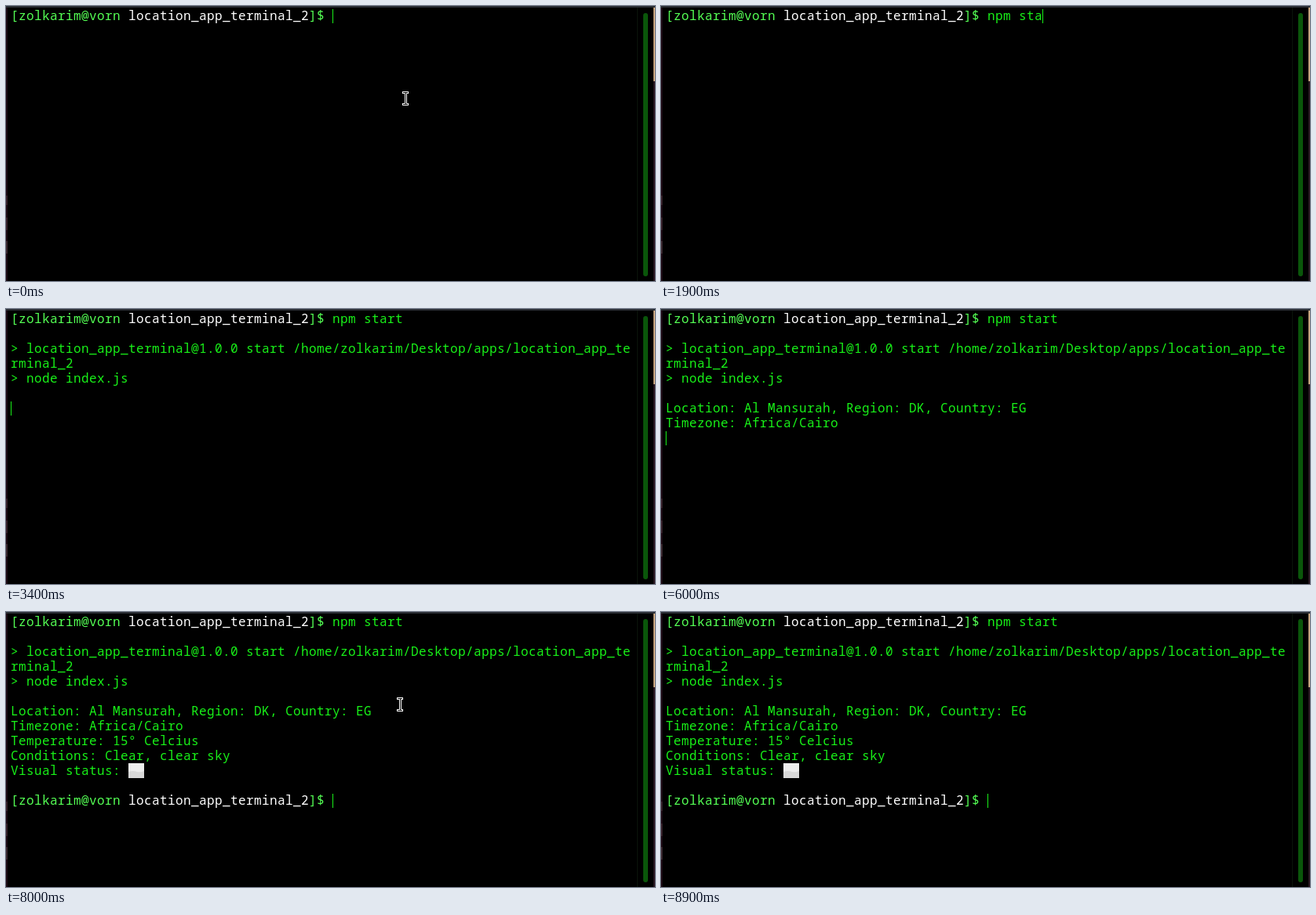
Write an HTML page with a canvas that moves like this. It is 827 by 351 pixels and loops after 9.4 s.

```html
<!DOCTYPE html>
<html lang="en">
<head>
<meta charset="utf-8">
<title>Terminal weather app</title>
<style>
html, body { margin: 0; width: 827px; height: 351px; overflow: hidden; background: #000; }
canvas { display: block; }
</style>
</head>
<body>
<canvas id="stage" width="827" height="351"></canvas>
<script>
const ctx = document.getElementById('stage').getContext('2d');
const LOOP = 9400, CELL = 10, ROW = 19, LEFT = 6;
const GREEN = '#18f018', BRIGHT = '#54ff54', WHITE = '#fff';
const COMMAND = 'npm start';
const KEY_TIMES = [900, 1100, 1400, 1600, 1700, 1900, 1900, 2200, 2400];

// [time, row, text]
const OUTPUT = [
  [3400, 2, '> location_app_terminal@1.0.0 start /home/zolkarim/Desktop/apps/location_app_te'],
  [3400, 3, 'rminal_2'],
  [3400, 4, '> node index.js'],
  [6000, 6, 'Location: Al Mansurah, Region: DK, Country: EG'],
  [6000, 7, 'Timezone: Africa/Cairo'],
  [6700, 8, 'Temperature: 15° Celcius'],
  [6700, 9, 'Conditions: Clear, clear sky'],
  [6700, 10, 'Visual status:']
];

// [time, x, y] of the pointer centre; no position means hidden
const POINTER = [
  [0, 509, 118], [900],
  [8000, 502, 118], [8100, 390, 72], [8200, 315, 36], [8300, 300, 29],
  [8600, 272, 24], [8700, 212, 15], [8800, 130, 5], [8900]
];

function rect(color, x, y, w, h) {
  ctx.fillStyle = color;
  ctx.fillRect(x, y, w, h);
}

function write(text, col, row, color = GREEN) {
  ctx.fillStyle = color;
  ctx.fillText(text, LEFT + col * CELL, 18 + row * ROW);
}

function prompt(row) {
  write('[zolkarim@vorn', 0, row, BRIGHT);
  write('location_app_terminal_2', 15, row, WHITE);
  write(']$', 38, row, BRIGHT);
}

function caret(col, row) {
  rect(GREEN, LEFT + col * CELL, 4 + row * ROW, 1, 18);
}

function windowFrame() {
  rect('#000', 0, 0, 827, 351);
  rect('#1c0a14', 0, 0, 2, 351);
  rect('#35202a', 0, 242, 2, 12);
  rect('#35202a', 0, 270, 2, 16);
  rect('#3a2830', 0, 300, 2, 16);
  rect('#2a1822', 825, 0, 2, 351);
  rect('#c9a680', 825, 0, 2, 96);
  rect('#2b2f35', 0, 0, 827, 2);
  rect('#0a140a', 804, 2, 1, 349);
  ctx.fillStyle = '#0a560a';
  ctx.beginPath();
  ctx.roundRect(812, 9, 6, 336, 3);
  ctx.fill();
}

function statusIcon() {
  rect('#ededed', 156, 193, 20, 19);
  ctx.fillStyle = '#d9d9d9';
  ctx.beginPath();
  ctx.moveTo(156, 204);
  ctx.quadraticCurveTo(162, 202, 167, 204);
  ctx.quadraticCurveTo(172, 205, 176, 203);
  ctx.lineTo(176, 212);
  ctx.lineTo(156, 212);
  ctx.fill();
}

function ibeam(x, y) {
  rect(WHITE, x - 4, y - 9, 8, 3);
  rect(WHITE, x - 4, y + 6, 8, 3);
  rect(WHITE, x - 1, y - 7, 3, 14);
  rect('#000', x - 3, y - 8, 6, 1);
  rect('#000', x - 3, y + 7, 6, 1);
  rect('#000', x, y - 8, 1, 16);
}

function draw(t) {
  windowFrame();
  ctx.font = '16px "Noto Sans Mono", monospace';
  ctx.letterSpacing = '0.4px';

  const typed = KEY_TIMES.filter(k => t >= k).length;
  prompt(0);
  write(COMMAND.slice(0, typed), 41, 0);
  for (const [start, row, text] of OUTPUT) if (t >= start) write(text, 0, row);

  if (t >= 6700) {
    statusIcon();
    prompt(12);
    caret(41, 12);
  } else if (t >= 3000) {
    caret(0, t >= 6000 ? 8 : t >= 3400 ? 6 : 1);
  } else {
    caret(41 + typed, 0);
  }

  const [, x, y] = POINTER.findLast(p => t >= p[0]);
  if (x !== undefined) ibeam(x, y);
}

function tick() {
  draw(performance.now() % LOOP);
  requestAnimationFrame(tick);
}
tick();
</script>
</body>
</html>
```
